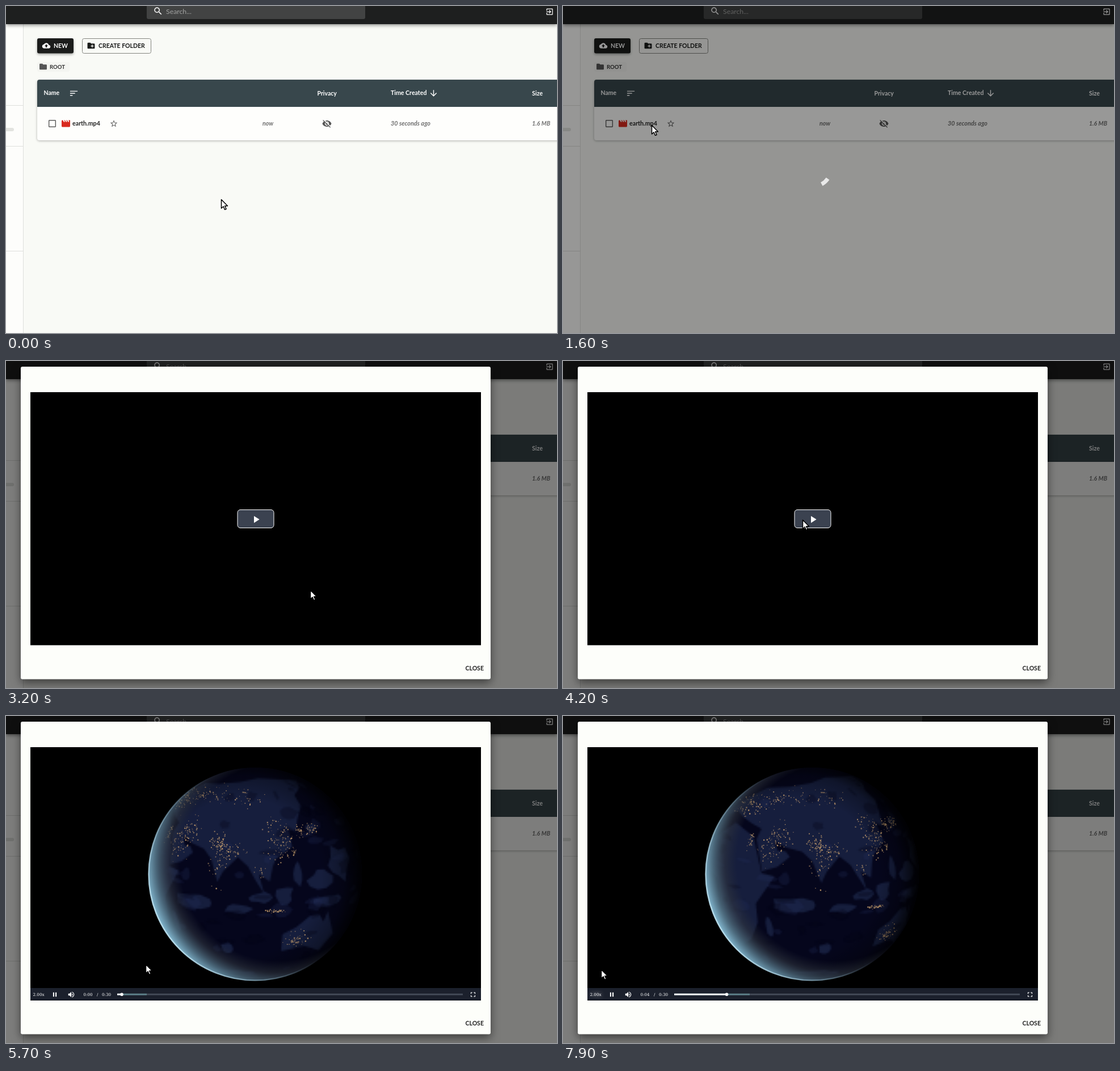
Animation of 971x577 px, one loop 8 s. Source, as an HTML page with a canvas:

```html
<!DOCTYPE html>
<html lang="en">
<head>
<meta charset="utf-8">
<title>File manager video preview</title>
<style>
html, body { margin: 0; width: 100%; height: 100%; overflow: hidden; background: #f9faf6; }
canvas { display: block; }
</style>
</head>
<body>
<canvas id="stage" width="971" height="577"></canvas>
<script>
const W = 971, H = 577, LOOP = 8000, STEP = 100;
const stage = document.getElementById('stage').getContext('2d');
let c = stage;

const icons = {
  search: 'M15.5 14h-.79l-.28-.27A6.471 6.471 0 0 0 16 9.5 6.5 6.5 0 1 0 9.5 16c1.61 0 3.09-.59 4.23-1.57l.27.28v.79l5 4.99L20.49 19l-4.99-5zm-6 0C7.01 14 5 11.99 5 9.5S7.01 5 9.5 5 14 7.01 14 9.5 11.99 14 9.5 14z',
  exit: 'M10.09 15.59L11.5 17l5-5-5-5-1.41 1.41L12.67 11H3v2h9.67l-2.58 2.59zM19 3H5c-1.11 0-2 .9-2 2v4h2V5h14v14H5v-4H3v4c0 1.1.89 2 2 2h14c1.1 0 2-.9 2-2V5c0-1.1-.9-2-2-2z',
  upload: 'M19.35 10.04C18.67 6.59 15.64 4 12 4 9.11 4 6.6 5.64 5.35 8.04 2.34 8.36 0 10.91 0 14c0 3.31 2.69 6 6 6h13c2.76 0 5-2.24 5-5 0-2.64-2.05-4.78-4.65-4.96zM14 13v4h-4v-4H7l5-5 5 5h-3z',
  addFolder: 'M20 6h-8l-2-2H4c-1.11 0-2 .89-2 2v12c0 1.11.89 2 2 2h16c1.11 0 2-.89 2-2V8c0-1.11-.89-2-2-2zm-1 8h-3v3h-2v-3h-3v-2h3V9h2v3h3v2z',
  folder: 'M10 4H4c-1.1 0-2 .9-2 2v12c0 1.1.9 2 2 2h16c1.1 0 2-.9 2-2V8c0-1.1-.9-2-2-2h-8l-2-2z',
  movie: 'M18 4l2 4h-3l-2-4h-2l2 4h-3l-2-4H8l2 4H7L5 4H4c-1.1 0-2 .9-2 2v12c0 1.1.9 2 2 2h16c1.1 0 2-.9 2-2V4h-4z',
  star: 'M22 9.24l-7.19-.62L12 2 9.19 8.63 2 9.24l5.46 4.73L5.82 21 12 17.27 18.18 21l-1.63-7.03L22 9.24zM12 15.4l-3.76 2.27 1-4.28-3.32-2.88 4.38-.38L12 6.1l1.71 4.04 4.38.38-3.32 2.88 1 4.28L12 15.4z',
  hidden: 'M12 7c2.76 0 5 2.24 5 5 0 .65-.13 1.26-.36 1.83l2.92 2.92c1.51-1.26 2.7-2.89 3.43-4.75-1.73-4.39-6-7.5-11-7.5-1.4 0-2.74.25-3.98.7l2.16 2.16C10.74 7.13 11.35 7 12 7zM2 4.27l2.74 2.74C3.08 8.3 1.78 10.02 1 12c1.73 4.39 6 7.5 11 7.5 1.55 0 3.03-.3 4.38-.84L19.73 22 21 20.73 3.27 3 2 4.27zM7.53 9.8l1.55 1.55c-.05.21-.08.43-.08.65 0 1.66 1.34 3 3 3 .22 0 .44-.03.65-.08l1.55 1.55c-.67.33-1.41.53-2.2.53-2.76 0-5-2.24-5-5 0-.79.2-1.53.53-2.2zm4.31-.78l3.15 3.15.02-.16c0-1.66-1.34-3-3-3l-.17.01z',
  box: 'M19 5v14H5V5h14m0-2H5c-1.1 0-2 .9-2 2v14c0 1.1.9 2 2 2h14c1.1 0 2-.9 2-2V5c0-1.1-.9-2-2-2z',
  sort: 'M3 18h6v-2H3v2zM3 6v2h18V6H3zm0 7h12v-2H3v2z',
  down: 'M20 12l-1.41-1.41L13 16.17V4h-2v12.17l-5.58-5.59L4 12l8 8 8-8z',
  volume: 'M3 9v6h4l5 5V4L7 9H3zm13.5 3c0-1.77-1.02-3.29-2.5-4.03v8.05c1.48-.73 2.5-2.25 2.5-4.02zM14 3.23v2.06c2.89.86 5 3.54 5 6.71s-2.11 5.85-5 6.71v2.06c4.01-.91 7-4.49 7-8.77s-2.99-7.86-7-8.77z',
  full: 'M7 14H5v5h5v-2H7v-3zm-2-4h2V7h3V5H5v5zm12 7h-3v2h5v-5h-2v3zM14 5v2h3v3h2V5h-5z',
  pause: 'M6 19h4V5H6v14zm8-14v14h4V5h-4z',
  play: 'M8 5v14l11-7z'
};
const arrow = new Path2D('M0 0V15.5L3.6 12.3 6 17.8 8.6 16.7 6.2 11.3H11Z');

// ---------- drawing helpers ----------
function rect(x, y, w, h, fill, r = 0) {
  c.fillStyle = fill;
  if (!r) return c.fillRect(x, y, w, h);
  c.beginPath();
  c.roundRect(x, y, w, h, r);
  c.fill();
}
function frame(x, y, w, h, color, r) {
  c.strokeStyle = color;
  c.lineWidth = 1;
  c.beginPath();
  c.roundRect(x, y, w, h, r);
  c.stroke();
}
function shadow(color, blur, dy) {
  c.shadowColor = color;
  c.shadowBlur = blur;
  c.shadowOffsetY = dy;
}
function noShadow() { shadow('transparent', 0, 0); }
function text(s, x, y, size, color, style = '700', family = 'Lato, sans-serif') {
  c.font = `${style} ${size}px ${family}`;
  c.fillStyle = color;
  c.fillText(s, x, y);
}
function icon(name, cx, cy, size, color) {
  c.save();
  c.translate(cx - size / 2, cy - size / 2);
  c.scale(size / 24, size / 24);
  c.fillStyle = color;
  c.fill(new Path2D(icons[name]));
  c.restore();
}
function canvas(w, h) {
  const cv = document.createElement('canvas');
  cv.width = w;
  cv.height = h;
  return cv;
}
function paint(cv, draw) {
  const outer = c;
  c = cv.getContext('2d');
  draw();
  c = outer;
  return cv;
}

// ---------- timing helpers ----------
const clamp = v => Math.max(0, Math.min(1, v));
const smooth = p => p * p * (3 - 2 * p);
const fade = (t, start) => smooth(clamp((t - start) / 225));
function track(keys, t, ease = p => p) {
  let i = 0;
  while (i < keys.length - 2 && t >= keys[i + 1][0]) i++;
  const [a, b] = [keys[i], keys[i + 1]];
  const p = ease(clamp((t - a[0]) / (b[0] - a[0])));
  return a.slice(1).map((v, k) => v + (b[k + 1] - v) * p);
}
const pointer = [
  [450, 379, 341], [850, 121, 226], [1000, 160, 213], [1200, 156, 210], [2350, 156, 210],
  [2900, 536, 404], [3600, 536, 404], [4000, 422, 287], [4200, 422, 280], [4400, 422, 280],
  [4750, 433, 295], [5200, 433, 295], [5700, 246, 438], [6100, 78, 468], [6500, 55, 486],
  [6950, 55, 486], [7300, 66, 447], [7500, 67, 447]
];
const spin = [[4400, 109], [4800, 105.5], [5700, 98], [6800, 72]];
// played and buffered ends of the seek bar
const seek = [[4800, 196, 226], [5700, 204, 248], [6800, 260, 300], [7300, 274, 314], [7600, 288.5, 329]];

// ---------- static layers ----------
const page = paint(canvas(W, H), () => {
  rect(0, 0, W, H, '#f9faf6');
  rect(0, 32, 30, H, '#fdfdfb');
  rect(30, 32, 1, H, '#dedfdc');
  for (const y of [175, 247, 432]) rect(0, y, 30, 1, '#dedfdc');
  rect(-4, 215, 18, 6, '#e2e3df', 3);

  shadow('rgba(0,0,0,.45)', 6, 2);
  rect(0, -4, W, 36, '#1e1f1f');
  noShadow();
  rect(248, -6, 385, 29, '#424343', 3);
  icon('search', 268, 9, 18, '#fff');
  text('Search...', 282, 13.5, 12.3, '#a2a3a2', '400');
  icon('exit', 958, 10, 15, '#fff');

  shadow('rgba(0,0,0,.35)', 4, 2);
  rect(55, 57, 64, 26.5, '#1b1c1b', 3);
  noShadow();
  icon('upload', 71, 70, 14.5, '#fff');
  text('NEW', 84, 73.5, 10.4, '#fff');
  frame(134.5, 57.5, 121, 26, '#83847f', 3);
  icon('addFolder', 150, 70, 15.5, '#1b1c1b');
  text('CREATE FOLDER', 163, 74, 10.5, '#1b1c1b');

  rect(55, 99, 57, 17, '#f4f5f1', 3);
  icon('folder', 65.5, 107, 15.5, '#555');
  text('ROOT', 77, 111, 9.6, '#333');

  shadow('rgba(0,0,0,.3)', 4, 1);
  rect(55, 131, W, 106, '#fefefc', 4);
  noShadow();
  rect(55, 130, W, 48, '#38474c', [4, 0, 0, 0]);
  text('Name', 66.5, 157, 10.5, '#fff');
  icon('sort', 119.5, 154, 17.5, '#fff');
  text('Privacy', 548.5, 157.5, 10.5, '#fff');
  text('Time Created', 678, 157, 10.6, '#fff');
  icon('down', 753.5, 154, 17, '#fff');
  text('Size', 927, 157.5, 10.5, '#fff');

  icon('box', 81.5, 207.5, 17.5, '#5d5d5d');
  icon('movie', 105.5, 207.5, 18, '#d9291e');
  text('earth.mp4', 117, 210.5, 10.7, '#222');
  icon('star', 190, 207.5, 15, '#5d5d5d');
  text('now', 452, 210.5, 10.7, '#707070', 'italic 700');
  icon('hidden', 565.5, 207.5, 17.5, '#555');
  text('30 seconds ago', 678, 210.5, 10.8, '#707070', 'italic 700');
  text('1.6 MB', 927, 210.5, 10.5, '#707070', 'italic 700');
});

const modal = paint(canvas(W, H), () => {
  shadow('rgba(0,0,0,.5)', 16, 6);
  rect(26, 10, 828, 551.5, '#fdfefa', 3);
  noShadow();
  rect(43, 55, 794, 446.5, '#000');
  text('CLOSE', 809.5, 545.5, 10.5, '#222');
  rect(408, 262.5, 64, 32, '#3b4250', 5);
  frame(408, 262.5, 64, 32, '#fff', 5);
  icon('play', 440.5, 279.5, 21, '#fff');
});

// ---------- globe ----------
const CX = 439, CY = 279, R = 188, TILT = 13 * Math.PI / 180;
const LEFT = CX - R - 6, TOP = CY - R - 6, SIDE = 2 * R + 12, SOFT = 3;
const ground = canvas(Math.ceil(SIDE / SOFT), Math.ceil(SIDE / SOFT));
let seed = 7;
const rnd = () => (seed = seed * 16807 % 2147483647) / 2147483647;
const bell = () => rnd() + rnd() + rnd() - 1.5;

const eurasia = [35,30, 43,13, 52,16, 59,22, 56,25, 51,25, 48,30, 56,27, 66,25, 72,20, 77,8, 80,14,
  88,22, 94,17, 98,10, 103,2, 100,13, 106,9, 108,17, 110,21, 121,27, 121,37, 126,35, 130,42, 140,50,
  142,58, 160,62, 178,67, 140,74, 105,77, 70,72, 40,67, 10,62, -5,48, -8,38, 3,42, 15,40, 26,38, 36,36];
const africa = [10,36, 32,31, 43,12, 51,11, 40,-5, 40,-16, 32,-28, 20,-34, 12,-16, 9,4, -10,6, -16,20];
const australia = [114,-22, 122,-18, 130,-12, 136,-12, 140,-17, 142,-11, 153,-27, 147,-38, 137,-34, 131,-32, 115,-34];
// islands and cloud banks: lon, lat, half width, half height
const patches = [[114,1,5,5], [101,0,6,3], [141,-5,9,3], [122,12,3,6], [138,36,4,3], [47,-19,2.5,6],
  [63,-4,12,4], [80,-32,4,4], [152,14,10,9], [137,8,8,5], [88,-6,8,3], [75,-55,20,3]];
// city lights: lon, lat, half width, half height, count
const cities = [[12,48,14,5,80], [31,29,1.5,3,22], [47,31,4,6,55], [53,34,7,4,20], [75,29.5,4,3,70],
  [84,25.5,6,2,40], [78,17,5,7,40], [114,31,6,8,95], [128,36,2,2,30], [137,35.5,4,2,35], [121,24,1,2,14],
  [101,14,2,2,14], [109,-7.2,4,.5,40], [124,-26,6,4,45], [70,58,28,5,60], [37,56,5,3,25], [46,22,6,4,25]];

const pairs = list => list.flatMap((v, i) => i % 2 ? [] : [[v, list[i + 1]]]);
function blob([lon, lat, w, h]) {
  return Array.from({ length: 10 }, (_, i) => {
    const a = i / 10 * 2 * Math.PI, k = .7 + rnd() * .6;
    return [lon + Math.cos(a) * w * k, lat + Math.sin(a) * h * k];
  });
}
const land = [eurasia, africa, australia].map(pairs).concat(patches.map(blob));
const mottle = Array.from({ length: 90 }, (_, i) => ({
  pts: blob([rnd() * 190, rnd() * 130 - 60, 2 + rnd() * 6, 1 + rnd() * 3]),
  color: i % 2 ? 'rgba(36,48,88,.28)' : 'rgba(2,3,20,.3)'
}));
const lights = cities.flatMap(([lon, lat, w, h, n]) => Array.from({ length: n }, () => ({
  lon: lon + bell() * 1.6 * w, lat: lat + bell() * 1.6 * h, size: .9 + rnd() * 1.5, alpha: .25 + rnd() * .6
})));

function project(lon, lat, mid) {
  const d = (lon - mid) * Math.PI / 180, f = lat * Math.PI / 180;
  const x = Math.cos(f) * Math.sin(d), k = Math.cos(f) * Math.cos(d);
  const y = Math.sin(f) * Math.cos(TILT) - k * Math.sin(TILT);
  const z = Math.sin(f) * Math.sin(TILT) + k * Math.cos(TILT);
  const s = z < 0 ? 1 / Math.hypot(x, y) : 1;
  return [CX + R * x * s, CY - R * y * s, z];
}
function shape(pts, mid, color) {
  const p = pts.map(q => project(...q, mid));
  if (p.every(q => q[2] < 0)) return;
  c.fillStyle = color;
  c.beginPath();
  p.forEach(q => c.lineTo(q[0], q[1]));
  c.fill();
}
function radial(x, y, r0, r1, stops) {
  const g = c.createRadialGradient(x, y, r0, x, y, r1);
  stops.forEach(([o, color]) => g.addColorStop(o, color));
  c.fillStyle = g;
  c.fillRect(LEFT, TOP, SIDE, SIDE);
}
function globe(mid) {
  // painted small and enlarged, which softens the coasts
  paint(ground, () => {
    c.setTransform(1 / SOFT, 0, 0, 1 / SOFT, -LEFT / SOFT, -TOP / SOFT);
    rect(LEFT, TOP, SIDE + SOFT, SIDE + SOFT, '#05061c');
    land.forEach(p => shape(p, mid, '#161e3d'));
    mottle.forEach(m => shape(m.pts, mid, m.color));
  });
  c.save();
  c.beginPath();
  c.arc(CX, CY, R, 0, 7);
  c.clip();
  c.drawImage(ground, LEFT, TOP, ground.width * SOFT, ground.height * SOFT);
  for (const l of lights) {
    const [x, y, z] = project(l.lon, l.lat, mid);
    if (z < .05) continue;
    c.fillStyle = `rgba(214,170,115,${l.alpha})`;
    c.fillRect(x, y, l.size, l.size);
  }
  radial(415, 285, 140, 214, [[0, 'rgba(0,0,0,0)'], [.55, 'rgba(0,0,0,.3)'], [1, 'rgba(0,0,0,.96)']]);
  radial(480, 258, 174, 233, [[0, 'rgba(40,45,55,0)'], [.35, 'rgba(48,54,64,.55)'],
    [.7, 'rgba(78,108,126,.9)'], [1, 'rgb(128,180,204)']]);
  c.restore();

  // bright atmosphere on the lit edge
  const rim = c.createLinearGradient(275, 365, 450, 262);
  rim.addColorStop(0, 'rgba(190,226,240,.85)');
  rim.addColorStop(1, 'rgba(130,170,190,0)');
  c.strokeStyle = rim;
  c.lineWidth = 2.5;
  c.beginPath();
  c.arc(CX, CY, R - .5, 0, 7);
  c.stroke();
}

// ---------- moving parts ----------
function controls(t) {
  const [played, loaded] = track(seek, t);
  const serif = ['400', '"DejaVu Serif", serif'];
  rect(43, 480, 794, 21.5, '#1b202c');
  if (t >= 6400) shadow('#fff', 8, 0);
  text('2.00x', 47.5, 493.5, 7.2, '#fff', ...serif);
  noShadow();
  icon('pause', 86, 491.5, 12.5, '#fff');
  icon('volume', 115, 491.5, 14, '#fff');
  const sec = Math.floor((played - 196) / 609 * 30);
  text('0:0' + sec, 136.5, 493.5, 7.2, '#fff', ...serif);
  text('/', 160, 493.5, 7.2, '#fff', ...serif);
  text('0:30', 169, 493.5, 7.2, '#fff', ...serif);
  rect(196, 489.8, 609, 2.8, '#444b58');
  rect(196, 489.8, loaded - 196, 2.8, '#5c7f88');
  rect(196, 489.8, played - 196, 2.8, '#fff');
  rect(played - 2.8, 488.4, 5.6, 5.6, '#fff', 2.8);
  icon('full', 823, 491.5, 14, '#fff');
}

const screen = canvas(W, H);
let shown;
function video(t) {
  const [mid] = track(spin, t);
  if (mid !== shown) {
    paint(screen, () => {
      rect(43, 55, 794, 446.5, '#000');
      globe(mid);
    });
    shown = mid;
  }
  c.drawImage(screen, 0, 0);
  controls(t);
}
function spinner(t, alpha) {
  const p = (t - 1477) / 1400 % 1;
  const grow = smooth(clamp(p * 2)), shrink = smooth(clamp(p * 2 - 1));
  const from = p * 2 * Math.PI + (15 * grow + 110 * shrink) / 20.2;
  const end = p * 2 * Math.PI + Math.min(126.9, 15 * grow + 110 * shrink + 1 + 99 * grow) / 20.2;
  c.globalAlpha = alpha;
  c.strokeStyle = '#fff';
  c.lineWidth = 7;
  c.beginPath();
  c.arc(440, 286, 32.5, from, end);
  c.stroke();
  c.globalAlpha = 1;
}
function cursor(t) {
  const [x, y] = track(pointer, t, smooth);
  c.save();
  c.translate(x + .5, y + .5);
  c.lineJoin = 'round';
  c.lineWidth = 1.5;
  c.strokeStyle = '#000';
  c.fillStyle = '#fff';
  c.fill(arrow);
  c.stroke(arrow);
  c.restore();
}

function draw(t) {
  c.drawImage(page, 0, 0);
  const dim = fade(t, 1440), open = fade(t, 2965);
  if (dim) rect(0, 0, W, H, `rgba(0,0,0,${dim * .505})`);
  if (t >= 1477 && open < 1) spinner(t, dim * (1 - open));
  if (open) {
    c.globalAlpha = open;
    c.drawImage(modal, 0, 0);
    c.globalAlpha = 1;
  }
  if (t >= 4400) video(t);
  cursor(t);
}

const begin = performance.now();
let last = -1;
function tick() {
  const t = Math.floor((performance.now() - begin) % LOOP / STEP) * STEP;
  if (t !== last) draw(last = t);
  requestAnimationFrame(tick);
}
tick();
</script>
</body>
</html>
```
